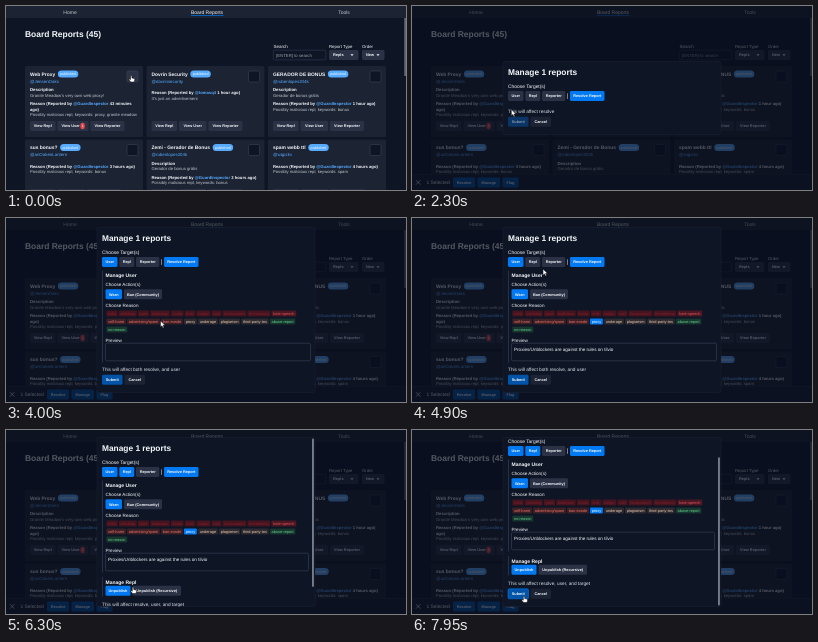
Animation, 400 px wide and 184 px high, one loop 8000 ms. Source, as an HTML page:

```html
<!DOCTYPE html>
<html lang="en">
<head>
<meta charset="utf-8">
<title>Board reports</title>
<style>
  html, body { margin: 0; width: 100%; height: 100%; overflow: hidden; background: #0e1525; }
  svg { display: block; width: 100vw; height: 100vh; }
  text { font-family: "Liberation Sans", Arial, sans-serif; text-rendering: geometricPrecision; white-space: pre; }
</style>
</head>
<body>
<svg id="stage" viewBox="0 0 400 184">
  <defs><clipPath id="panelClip"><rect id="clipRect" x="91" width="218" rx="1.5"/></clipPath></defs>
  <g id="page"></g>
  <g id="bar"></g>
  <g id="modal">
    <rect width="400" height="184" fill="#080d1b" fill-opacity=".68"/>
    <g id="panel"></g>
  </g>
  <g id="cursor" fill="#fff" stroke="#111" stroke-width=".55" stroke-linejoin="round">
    <path id="arrow" d="M0 0V6.2L1.5 4.9L2.5 7.1L3.6 6.6L2.6 4.5H4.6Z"/>
    <path id="hand" d="M-.7 .4Q0-.5 .7 .4V2.5L3 3.1Q3.7 3.4 3.6 4.2L3 6.5H-.5L-2.2 4.3Q-2.3 3.4-1.4 3.6L-.7 4.2Z"/>
  </g>
</svg>
<script>
const LOOP = 8000;
const C = {
  bg: '#0e1525', card: '#1c2333', button: '#2b3245', line: '#3c445c', text: '#f5f9fc',
  soft: '#c2c8cc', link: '#57abff', blue: '#0079f2', deepBlue: '#0053a6', red: '#e5484d',
  scroll: '#767d8a'
};
const $ = id => document.getElementById(id);
const ink = document.createElement('canvas').getContext('2d');

function widthOf(str, size, bold) {
  ink.font = `${bold ? 'bold ' : ''}100px "Liberation Sans", Arial, sans-serif`;
  return ink.measureText(str).width * size / 100;
}

// y is the middle of the capital letters
function text(str, x, y, size, { bold, fill = C.text, anchor = 'start' } = {}) {
  return `<text x="${x}" y="${y + size * .358}" font-size="${size}" fill="${fill}" ` +
    `text-anchor="${anchor}"${bold ? ' font-weight="700"' : ''}>${str}</text>`;
}

function rect(x, y, w, h, fill, rx = 0, extra = '') {
  return `<rect x="${x}" y="${y}" width="${w}" height="${h}" rx="${rx}" fill="${fill}" ${extra}/>`;
}

// y is the vertical middle of the button
function button(label, x, y, w, { fill = C.button, color = C.text, hover } = {}) {
  return rect(x, y - 5, w, 10, fill, 1.4, hover ? `stroke="${C.blue}" stroke-width=".6"` : '') +
    text(label, x + w / 2, y, 3.85, { bold: true, fill: color, anchor: 'middle' });
}

function checkbox(x, y, checked, hover) {
  const fill = checked ? C.blue : hover ? C.button : C.bg;
  const box = rect(x, y, 11, 11, fill, 1.2,
    `stroke="${checked ? C.blue : C.line}" stroke-width=".6"`);
  return checked
    ? box + `<path d="M${x + 2.5} ${y + 5.7}l2.3 2.4 3.9-5" fill="none" stroke="#fff" stroke-width="1.4"/>`
    : box;
}

const MOD = '@GuardInspector';
const FLAGGED = 'Possibly malicious repl, keywords: ';
const cards = [
  { title: 'Web Proxy', user: '@JensenOaks', about: "Granite Meadow's very own web proxy!",
    by: MOD, note: FLAGGED + 'proxy, granite meadow', wrap: true, warned: true },
  { title: 'Dovrin Security', user: '@dovrinsecurity', by: '@tomasq4', age: '1 hour',
    note: "It's just an advertisement" },
  { title: 'GERADOR DE BONUS', user: '@rubenlopes204k', about: 'Gerador de bonus grátis',
    by: MOD, age: '1 hour', note: FLAGGED + 'bonus' },
  { title: 'sus bonus?', user: '@anOakenLantern', by: MOD, age: '3 hours', note: FLAGGED + 'bonus' },
  { title: 'Zemi - Gerador de Bonus', user: '@rubenlopes204k', about: 'Gerador de bonus grátis',
    by: MOD, age: '3 hours', note: FLAGGED + 'bonus' },
  { title: 'spam webb ttl', user: '@wqpzkv', by: MOD, age: '4 hours', note: FLAGGED + 'spam' }
];

function drawCard(card, i, checked) {
  const lower = i > 2;
  const x = 19 + 121.5 * (i % 3), y = lower ? 133.5 : 60, left = x + 5;
  const buttonY = y + (lower ? 54.4 : 60);
  const pill = left + widthOf(card.title, 4.9, true) + 2.6;
  let out = rect(x, y, 118, 71, C.card, 1.5) +
    text(card.title, left, y + 7.8, 4.9, { bold: true }) +
    rect(pill, y + 4.4, 20.5, 7.2, C.link, 3.6) +
    text('published', pill + 10.25, y + 8, 3.7, { anchor: 'middle' }) +
    text(card.user, left, y + 15, 4.4, { fill: C.link }) +
    checkbox(x + 102, y + 5, checked, i === 0);
  let row = y + 26.5;
  if (card.about) {
    out += text('Description', left, y + 23.5, 4.3, { bold: true }) +
      text(card.about, left, y + 29.3, 4.25, { fill: C.soft });
    row = y + 37.5;
  }
  const age = card.age || (checked ? '44 minutes' : '43 minutes');
  const tail = card.wrap ? '' : ' ago)';
  out += text(`Reason (Reported by <tspan fill="${C.link}">${card.by}</tspan> ${age}${tail}`,
    left, row, 4.2, { bold: true });
  if (card.wrap) out += text('ago)', left, row += 5.6, 4.2, { bold: true });
  out += text(card.note, left, row + 5.7, 4.2, { fill: C.soft });
  const wide = card.warned ? 31 : 27.5;
  out += button('View Repl', left, buttonY, 25.5) +
    button(card.warned ? '' : 'View User', left + 27.5, buttonY, wide) +
    button('View Reporter', left + 29.5 + wide, buttonY, 34);
  if (card.warned) {
    out += text('View User', left + 31.5, buttonY, 3.85, { bold: true }) +
      rect(left + 50.4, buttonY - 3.2, 4.4, 6.4, C.red, 2.2) +
      text('1', left + 52.6, buttonY, 3.4, { anchor: 'middle' });
  }
  return out;
}

function select(label, value, x, w) {
  return text(label, x, 40, 4.3) + rect(x, 44, w, 10, C.button, 1.4) +
    text(value, x + 4, 49, 3.9, { bold: true }) +
    `<path d="M${x + w - 8} 48.2h3l-1.5 1.8Z" fill="${C.text}"/>`;
}

function drawPage(checked) {
  const tab = (label, x, fill) => text(label, x, 6, 5, { fill, anchor: 'middle' });
  return rect(0, 0, 400, 184, C.bg) + rect(0, 0, 400, 12, C.card) +
    tab('Home', 64, C.soft) + tab('Board Reports', 201, C.text) + tab('Tools', 338, C.soft) +
    rect(185, 9.3, 32.5, .7, C.blue) +
    rect(398.4, 12, 1.4, 58, C.scroll) +
    text('Board Reports (45)', 19, 28, 8.45, { bold: true }) +
    text('Search', 267.5, 40, 4.5) +
    rect(267.3, 44.2, 52.5, 9.6, C.bg, 1.2, `stroke="${C.line}" stroke-width=".5"`) +
    text('[ENTER] to search', 270, 49, 4.3, { fill: '#9da2a6' }) +
    select('Report Type', 'Repls', 323, 29.5) + select('Order', 'New', 356, 22.5) +
    cards.map((card, i) => drawCard(card, i, checked && i === 0)).join('');
}

function drawBar(hover) {
  const fill = C.deepBlue;
  return rect(0, 168, 400, 16, '#151d30') + rect(0, 168, 400, .4, C.button) +
    `<path d="M4 174.2l4.4 4.4m0-4.4l-4.4 4.4" stroke="${C.text}" stroke-width=".7"/>` +
    text('1 Selected', 14.5, 176.4, 4.9) +
    button('Resolve', 41, 176.4, 22, { fill }) +
    button('Manage', 65.5, 176.4, 22.5, { fill, hover }) +
    button('Flag', 90.5, 176.4, 16, { fill });
}

const tagRows = [
  'nsfw phishing gore malicious scam leak vulgar raid harassment threatening hate-speech',
  'self-harm advertising/spam ban-evade proxy underage plagiarism third-party-tos abuse-report',
  'no-reason'
];

function tagStyle(label, row) {
  if (/^(abuse-report|no-reason)$/.test(label)) return ['#18352f', '#62d08a'];
  if (label === 'hate-speech') return ['#4a1822', '#e0525c'];
  if (row === 0) return ['#44141f', '#82202c'];
  if (/self|spam|evade/.test(label)) return ['#3b2027', '#f0705f'];
  return ['#2c2a30', '#ecc9ae'];
}

function drawTags(y, picked) {
  return tagRows.map((words, row) => {
    let x = 102;
    return words.split(' ').map(label => {
      const w = widthOf(label, 3.9), on = picked && label === 'proxy';
      const [fill, color] = on ? [C.blue, C.text] : tagStyle(label, row);
      const out = rect(x - 1.7, y + row * 8 - 3.1, w + 3.4, 6.2, fill, 1) +
        text(label, x, y + row * 8, 3.9, { fill: color });
      x += w + 4.5;
      return out;
    }).join('');
  }).join('');
}

function panelSize(s) {
  const content = s.repl ? 190 : s.warn ? 165 : s.user ? 104 : 73;
  const h = Math.min(content, 169);
  return { content, h, top: 92 - h / 2 };
}

function drawPanel(s) {
  const { content, h, top } = panelSize(s);
  const pick = on => ({ fill: on ? C.blue : C.button });
  const target = s.repl ? 'resolve, user, and target' : s.user ? 'both resolve, and user' : 'resolve';
  let out = text('Manage 1 reports', 96, 10.5, 8.35, { bold: true }) +
    text('Choose Target(s)', 96, 24.5, 4.9) +
    button('User', 96, 34.5, 15.5, pick(s.user)) +
    button('Repl', 113.3, 34.5, 15, pick(s.repl)) +
    button('Reporter', 130, 34.5, 23.3) +
    rect(155.4, 31.8, .6, 5.6, C.soft) +
    button('Resolve Report', 158, 34.5, 34.5, pick(true));
  if (s.user) {
    out += rect(96, 43, .6, s.warn ? 92 : 30, C.line) +
      text('Manage User', 99.5, 48, 5, { bold: true }) +
      text('Choose Action(s)', 99.5, 57, 4.6) +
      button('Warn', 99.5, 66.7, 16.5, pick(s.warn)) +
      button('Ban (Community)', 118, 66.7, 38);
  }
  if (s.warn) {
    out += text('Choose Reason', 99.5, 77.5, 4.6) + drawTags(86, s.reason) +
      text('Preview', 99.5, 112.5, 4.6) +
      rect(99.5, 115.7, s.repl ? 203 : 205, 17.6, C.bg, 1.2, `stroke="${C.line}" stroke-width=".6"`);
    if (s.reason) out += text('Proxies/Unblockers are against the rules on tilvio', 102, 121.5, 4.6);
  }
  if (s.repl) {
    out += rect(96, 139.5, .6, 19.5, C.line) +
      text('Manage Repl', 99.5, 144.5, 5, { bold: true }) +
      button('Unpublish', 99.5, 153.3, 25, pick(s.unpublish)) +
      button('Unpublish (Recursive)', 126.5, 153.3, 48.5);
  }
  const submit = s.warn
    ? { fill: C.deepBlue, hover: s.submitHover }
    : { fill: '#0a3566', color: '#8b98ab' };
  out += text('This will affect ' + target, 96, content - 23.5, 4.75, { fill: '#dde2e8' }) +
    button('Submit', 96, content - 12.7, 20.5, submit) +
    button('Cancel', 118.5, content - 12.7, 20.5, { fill: C.card });
  const scrollbar = s.repl
    ? rect(306, top + 1 + s.scroll * h / content, 1.9, h * h / content - 2, C.scroll, .9) : '';
  return rect(91, top, 218, h, C.bg, 1.5, `stroke="${C.card}" stroke-width=".5"`) +
    `<g clip-path="url(#panelClip)"><g transform="translate(0 ${top - s.scroll})">${out}</g></g>` + scrollbar;
}

const ease = p => p * p * (3 - 2 * p);
const progress = (t, from, to) => ease(Math.min(1, Math.max(0, (t - from) / (to - from))));

// time, x, y of the pointer tip
const path = [
  [0, 125.2, 69.5], [700, 125.2, 69.5], [1450, 82, 173], [1750, 82, 173], [2500, 103, 89],
  [2700, 103, 89], [3150, 105, 95], [3450, 107, 105], [3600, 107, 105], [4300, 185, 101.5],
  [4500, 185, 101.5], [4900, 131, 51], [5120, 121, 41], [5250, 121, 41], [5750, 113, 157],
  [5900, 113, 157], [6300, 127, 157], [6500, 126.5, 156], [6850, 112, 166], [8000, 112, 166]
];
const handTimes = [[0, 800], [1300, 1850], [2400, 2850], [3300, 3700], [4200, 4600], [5000, 5350], [5650, 6350], [6720, 8000]];

function pointerAt(t) {
  const i = path.findIndex(k => k[0] > t);
  const [t0, x0, y0] = path[i - 1], [t1, x1, y1] = path[i];
  const p = progress(t, t0, t1);
  return [x0 + (x1 - x0) * p, y0 + (y1 - y0) * p];
}

const drawn = {};
function paint(id, key, draw) {
  if (drawn[id] === key) return;
  drawn[id] = key;
  $(id).innerHTML = draw();
}

function render(t) {
  const checked = t >= 650;
  const hover = t >= 1350 && t < 1800;
  paint('page', checked, () => drawPage(checked));
  paint('bar', checked + ' ' + hover, () => checked ? drawBar(hover) : '');

  const s = {
    user: t >= 2650, warn: t >= 3500, reason: t >= 4400, repl: t >= 5150, unpublish: t >= 5830,
    submitHover: t >= 6750, scroll: 21 * progress(t, 6320, 6490)
  };
  const { top, h } = panelSize(s);
  $('clipRect').setAttribute('y', top);
  $('clipRect').setAttribute('height', h);
  $('modal').setAttribute('opacity', progress(t, 1650, 1800));
  paint('panel', JSON.stringify(s), () => drawPanel(s));

  const hand = handTimes.some(([from, to]) => t >= from && t < to);
  $('hand').setAttribute('display', hand ? 'inline' : 'none');
  $('arrow').setAttribute('display', hand ? 'none' : 'inline');
  $('cursor').setAttribute('transform', `translate(${pointerAt(t).join(' ')})`);
}

const start = performance.now();
function tick() {
  render((performance.now() - start) % LOOP);
  requestAnimationFrame(tick);
}
tick();
</script>
</body>
</html>
```
